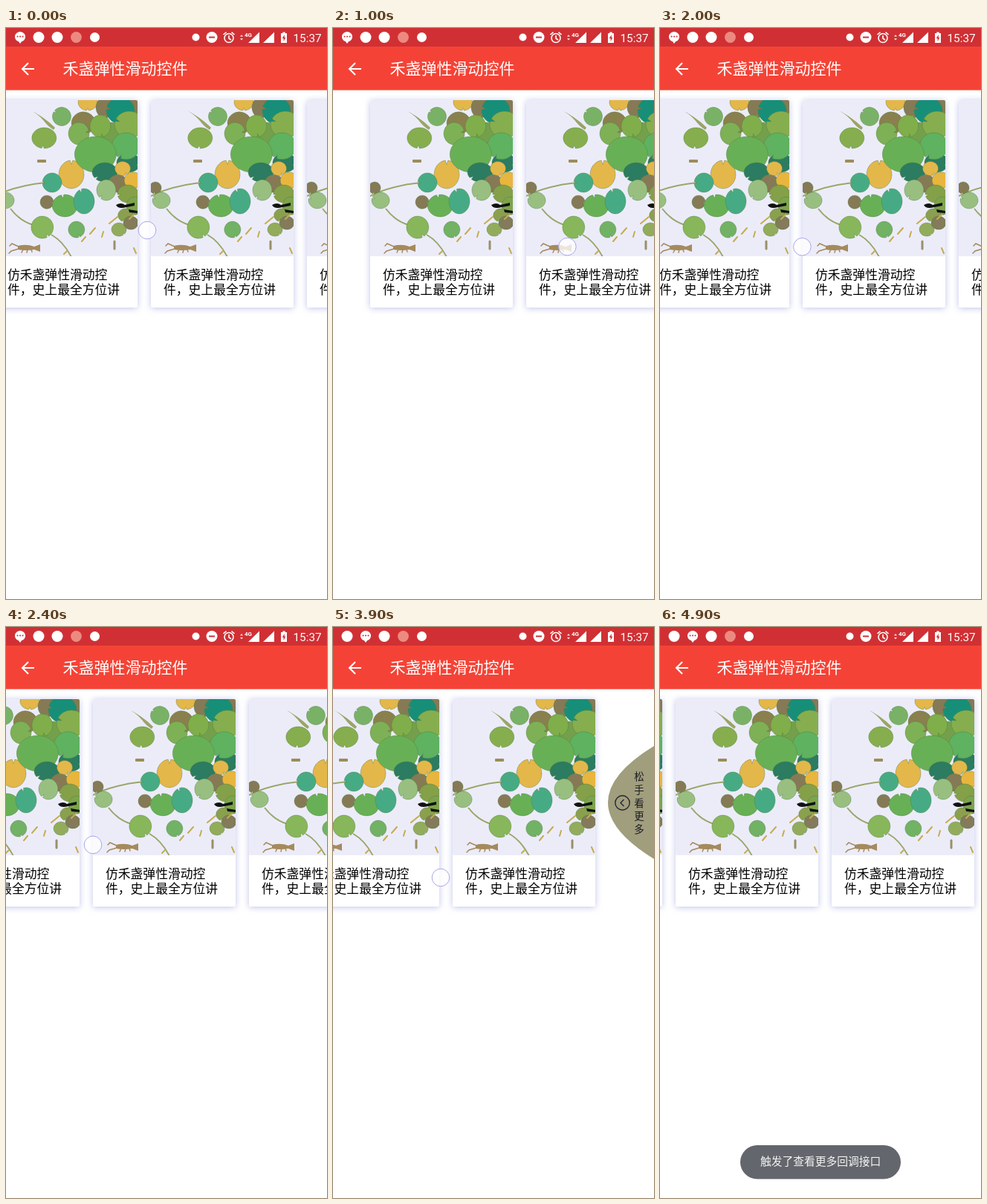
An HTML page for the animation above (5000 ms loop, 432 by 768 pixels).

```html
<!DOCTYPE html>
<html lang="zh-CN">
<head>
<meta charset="utf-8">
<style>
  html, body { margin: 0; width: 100%; height: 100%; overflow: hidden; background: #fff; }
  svg { display: block; }
  text { font-family: "Noto Sans CJK SC", "Noto Sans CJK", "Noto Sans", sans-serif; }
  .title { font-size: 21px; fill: #fff; }
  .caption { font-size: 16.8px; fill: #000; }
  .clock, .net { font-family: Roboto, sans-serif; fill: #fff; }
  .clock { font-size: 15.3px; }
  .net { font-size: 8px; font-weight: 700; }
  .hint { font-size: 13.5px; fill: #1c1c26; text-anchor: middle; }
  .toast { font-size: 14.75px; fill: #f4f4f4; text-anchor: middle; }
  .paper { fill: #fff; filter: drop-shadow(0 1.5px 4px rgba(125, 135, 215, .5)); }
  .line { fill: none; stroke: #fff; }
</style>
</head>
<body>
<svg width="432" height="768" viewBox="0 0 432 768">
  <defs>
    <clipPath id="frame"><rect width="192" height="210" rx="2"/></clipPath>
    <g id="card">
      <rect class="paper" width="192" height="279" rx="2"/>
      <g clip-path="url(#frame)">
        <rect width="192" height="210" fill="#ececf9"/>
        <g fill="none" stroke="#9aa66a" stroke-width="2">
          <path d="M0 129Q28 115 68 111M21 146Q34 163 52 168M76 181Q92 190 103 211"/>
        </g>
        <path d="M43 11Q66 22 81 37L79 40Q71 35 66 28Q58 18 43 11Z" fill="#9aa568"/>
        <rect x="57" y="80" width="12" height="4" rx="1" fill="#9b8d5c"/>
        <g id="pads"></g>
        <path d="M163 141Q170 137 175 141L188 138V142L177 144Q166 147 163 141ZM180 147L192 149V152L181 151Z" fill="#111"/>
        <g stroke="#c6ac52" stroke-width="2" stroke-linecap="round">
          <path d="M128 180L135 172M154 166L165 157M117 190L122 184M144 184L146 177M181 160L187 154M93 207L97 203M187 199L190 206"/>
          <path d="M161 190V200" stroke="#9a9068" stroke-width="3"/>
        </g>
        <g fill="#a58a5c" stroke="#a58a5c" stroke-linecap="round">
          <path d="M31 196Q43 193 53 197L61 194V204L53 201Q42 203 31 201Z" stroke="none"/>
          <path d="M32 197L23 193L20 196M32 200L22 203L19 206M38 201L36 205M44 201L43 205M49 201L50 204" fill="none" stroke-width="1.5"/>
        </g>
      </g>
      <text class="caption" x="17" y="241">仿禾盏弹性滑动控</text>
      <text class="caption" x="17" y="261">件，史上最全方位讲</text>
    </g>
    <g id="bubble">
      <path d="M0-7.5A7.2 6.8 0 0 1 2 5.8L0 8.5L-2 5.8A7.2 6.8 0 0 1 0-7.5Z" fill="#fff"/>
      <path d="M-3.5-1h.1M0-1h.1M3.5-1h.1" stroke="#d03034" stroke-width="2" stroke-linecap="round"/>
    </g>
  </defs>

  <rect width="432" height="768" fill="#fff"/>
  <g id="row"></g>

  <g id="more">
    <path id="bulge" fill="#a09e7c"/>
    <g id="label">
      <g fill="none" stroke="#26263a" stroke-width="1.4">
        <circle cx="389.5" cy="236.5" r="9.7"/>
        <path d="M391.5 232L387 236.5L391.5 241"/>
      </g>
    </g>
  </g>

  <rect width="432" height="83.6" fill="#f44336"/>
  <rect width="432" height="25" fill="#d03034"/>
  <path class="line" d="M38 55H22.5M30 47L22 55L30 63" stroke-width="2.1"/>
  <text class="title" x="76.5" y="61.7">禾盏弹性滑动控件</text>

  <use id="msg" href="#bubble" y="12.5"/>
  <circle id="dot" cy="12.5" r="7.5" fill="#fff"/>
  <circle cx="69" cy="12.5" r="7.5" fill="#fff"/>
  <circle cx="94.5" cy="12.5" r="7.4" fill="#ec8a80"/>
  <circle cx="119.5" cy="12.5" r="6.5" fill="#fff"/>
  <circle cx="255.5" cy="12.5" r="5" fill="#fff"/>
  <circle cx="277" cy="12.5" r="7.5" fill="#fff"/>
  <rect x="273" y="11.5" width="8" height="2" fill="#d03034"/>
  <g class="line" stroke-width="1.6">
    <circle cx="300" cy="13.5" r="6"/>
    <path d="M300 10V14L303 16M292.5 9L296.5 5.6M307.5 9L303.5 5.6"/>
  </g>
  <path d="M315 11.5L317 9L319 11.5ZM315 14L317 16.5L319 14Z" fill="#fff" opacity=".85"/>
  <path d="M326 20H341V5.5ZM346 20H361V5.5Z" fill="#fff"/>
  <text class="net" x="321" y="12" stroke="#d03034" stroke-width="1.5" paint-order="stroke">4G</text>
  <path d="M370 7H372.3V5.5H375.7V7H378V20H370Z" fill="#fff"/>
  <path d="M374.7 9L371.8 14H373.6V18L376.4 12.8H374.7Z" fill="#d03034"/>
  <text class="clock" x="386.5" y="18.5">15:37</text>

  <circle id="finger" r="11.8" fill="#fff" fill-opacity=".78" stroke="#a9a6ea" stroke-width="1"/>
  <g id="toast">
    <rect x="108" y="697" width="216" height="45.5" rx="22.7" fill="#63666c"/>
    <text class="toast" x="216" y="724.3">触发了查看更多回调接口</text>
  </g>
</svg>

<script>
const NS = 'http://www.w3.org/2000/svg';
const $ = id => document.getElementById(id);
const add = (parent, tag, attrs) => {
  const el = document.createElementNS(NS, tag);
  for (const k in attrs) el.setAttribute(k, attrs[k]);
  return parent.appendChild(el);
};

// Lily pad: an ellipse with a narrow notch facing `dir` degrees.
function pad(x, y, rx, ry, fill, dir) {
  const at = (deg, k) => {
    const a = deg * Math.PI / 180;
    return `${(x + rx * k * Math.cos(a)).toFixed(1)} ${(y + ry * k * Math.sin(a)).toFixed(1)}`;
  };
  add($('pads'), 'path', {
    d: `M${at(dir + 6, 1)}A${rx} ${ry} 0 1 1 ${at(dir - 6, 1)}L${at(dir, .7)}Z`,
    fill, stroke: '#4f7a3c', 'stroke-opacity': .45, 'stroke-width': .9
  });
}

const OLIVE = '#86ae4e', GREEN = '#68b056', TEAL = '#46ab84', DEEP = '#178f78',
      PALE = '#98bf80', BROWN = '#857a55', YELLOW = '#e4b74a', DARK = '#2b7c60';

pad(6, 118, 8, 8, BROWN, 100);
pad(14, 135, 12, 11, PALE, 200);
pad(66, 51, 16.5, 14, OLIVE, 95);
pad(90, 22, 12.5, 12.5, '#79b266', 215);
pad(103, 100, 17, 19, YELLOW, 270);
pad(77, 111, 13, 13, TEAL, 180);
pad(70, 137, 9, 9, BROWN, 10);
pad(94, 142, 17, 15, GREEN, 260);
pad(120, 136, 14, 17, TEAL, 250);
pad(64, 171, 15, 15, '#88b65a', 60);
pad(110, 174, 11, 11, '#72b264', 70);
pad(167, 174, 10, 9, '#92ac5c', 50);
pad(125, 3, 13, 11, YELLOW, 90);
pad(148, 10, 12, 14, BROWN, 90);
pad(187, 8, 12, 12, BROWN, 90);
pad(119, 31, 16, 15, '#8a804e', 30);
pad(157, 45, 15, 15, '#74a04c', 0);
pad(169, 14, 19, 18, DEEP, 190);
pad(113, 45, 14, 15, '#7eb056', 350);
pad(142, 35, 14, 15, '#7fae4a', 80);
pad(181, 33, 20, 18, OLIVE, 200);
pad(180, 84, 16, 13, DARK, 20);
pad(177, 62, 19, 18, '#5eb260', 120);
pad(135, 73, 28, 24, GREEN, 80);
pad(148, 97, 17, 13, DARK, 140);
pad(166, 112, 13, 12, BROWN, 60);
pad(172, 92, 10.5, 9.5, YELLOW, 60);
pad(186, 108, 12, 11, '#e8b63e', 30);
pad(150, 121, 13, 14, PALE, 130);
pad(179, 126, 14, 12, '#84a048', 170);
pad(188, 142, 11, 12, '#7ca44c', 30);
pad(176, 155, 10, 9, '#8aa04e', 110);
pad(183, 165, 10, 9, '#837b5a', 200);

const STEP = 210, FIRST = 9, END = -189, CYCLE = 5000;
for (let i = 0; i < 3; i++) add($('row'), 'use', { href: '#card', x: i * STEP, y: 97 });
[...'松手看更多'].forEach((c, i) => {
  add($('label'), 'text', { class: 'hint', x: 412, y: 206 + i * 17.8 }).textContent = c;
});

const clamp = v => Math.max(0, Math.min(1, v));
const sineIn = p => 1 - Math.cos(p * Math.PI / 2);
const sineOut = p => Math.sin(p * Math.PI / 2);
const sineBoth = p => (1 - Math.cos(p * Math.PI)) / 2;

// Touch path: start, end, from x, y, to x, y, easing
const strokes = [
  [0, 600, 190, 272, 311, 291, sineOut],
  [600, 900, 311, 291, 316, 294, sineOut],
  [900, 1500, 316, 294, 297, 296, sineIn],
  [1500, 2400, 297, 296, 117, 293, sineBoth],
  [3400, 3900, 318, 329, 145, 337, sineOut]
];

function touch(t) {
  const s = strokes.find(s => t >= s[0] && t <= s[1]);
  if (!s) return null;
  const [a, b, x0, y0, x1, y1, ease] = s, k = ease((t - a) / (b - a));
  return { x: x0 + (x1 - x0) * k, y: y0 + (y1 - y0) * k };
}

// Left edge of the first card
function rowX(t, finger) {
  if (t <= 2400) {
    const pull = finger.x - (214 + t / 480);
    return FIRST + (pull < 0 ? pull : 44 * (1 - Math.exp(-pull / 39)));
  }
  if (t < 3400) return END + 96 * Math.pow(1 - clamp((t - 2400) / 800), 1.29);
  if (t <= 3900) return END - 70 * sineOut((t - 3400) / 500);
  return END - 70 * Math.pow(1 - clamp((t - 3900) / 400), 2);
}

function draw(t) {
  const finger = touch(t), x = rowX(t, finger), over = Math.max(0, END - x);
  $('row').setAttribute('transform', `translate(${Math.round(x)} 0)`);

  $('finger').style.display = finger ? '' : 'none';
  if (finger) $('finger').setAttribute('transform', `translate(${finger.x} ${finger.y})`);

  const depth = 62 * over / 70;
  $('more').style.display = over > .5 ? '' : 'none';
  $('bulge').setAttribute('d', `M432 160Q${432 - 2 * depth} 236 432 312Z`);
  $('label').setAttribute('transform', `translate(${62 - depth} 0)`);

  const swapped = t >= 3400;
  $('msg').setAttribute('x', swapped ? 44 : 19);
  $('dot').setAttribute('cx', swapped ? 19 : 44);
  $('toast').style.opacity = t < 4000 ? 0 : clamp((t - 3900) / 300);
}

const start = performance.now();
function tick() {
  const t = (performance.now() - start) % CYCLE;
  draw(Math.floor(t / 100) * 100);
  requestAnimationFrame(tick);
}
tick();
</script>
</body>
</html>
```
